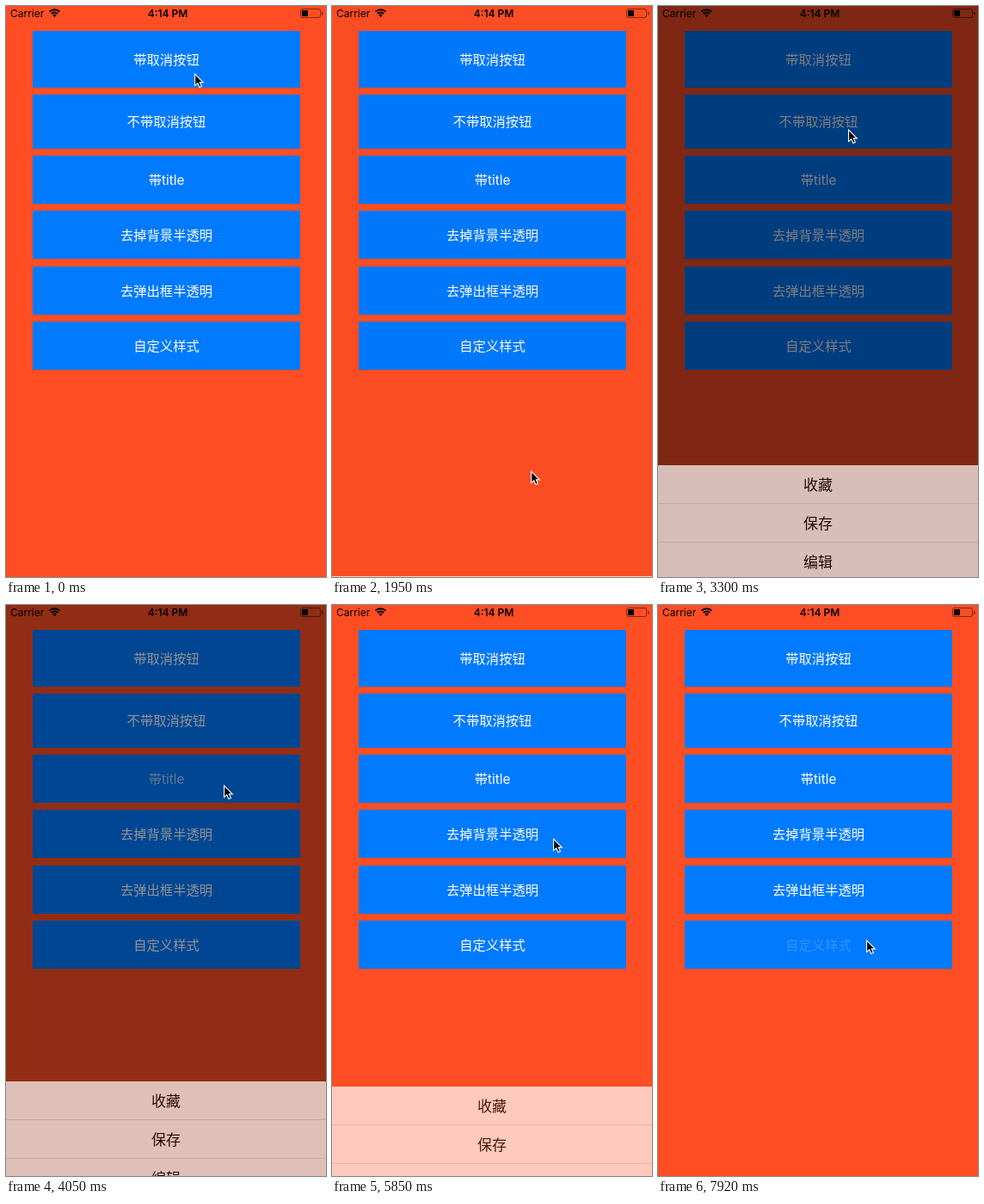
An HTML page with a canvas for the animation above (8000 ms loop, 372 by 664 pixels).

```html
<!DOCTYPE html>
<html lang="zh-CN">
<head>
<meta charset="utf-8">
<style>
html, body { margin: 0; width: 100%; height: 100%; overflow: hidden; background: #ff4e24; }
canvas { display: block; width: 372px; height: 664px; }
</style>
</head>
<body>
<canvas id="stage" width="372" height="664"></canvas>
<script>
const W = 372, H = 664, LOOP = 8000;
const STEP = 149.4, TICK = 150;   // the screen refreshes in steps
const FLOOR = 669;                // sheets rest slightly below the visible edge
const ROW = 45, GAP = 5;
const HOLD = 150, FADE = 340, SLIDE = 250;
const CJK = 'Inter, "Noto Sans CJK SC", "Noto Sans CJK", sans-serif';
const LATIN = 'Inter, Roboto, sans-serif';
const ctx = document.getElementById('stage').getContext('2d');

// Each button is clicked, its sheet opens, and a tap closes it again.
const scenes = [
  { label: '带取消按钮', click: 300, close: 1727, cancel: true },
  { label: '不带取消按钮', click: 2600, close: 3340 },
  { label: '带title', click: 3860, close: 4505 },
  { label: '去掉背景半透明', click: 5150, close: 5780, clearBack: true },
  { label: '去弹出框半透明', click: 6403, close: 7290, solid: true },
  { label: '自定义样式', click: LOOP, close: LOOP }
];

// The pointer sets off for each stop at the given time.
const home = { x: 219, y: 78 };
const stops = [
  { at: 513, x: 233, y: 640 },
  { at: 1778, x: 221, y: 143 },
  { at: scenes[1].close, x: 253, y: 209 },
  { at: scenes[2].close, x: 260, y: 263 },
  { at: scenes[3].close, x: 241, y: 319 },
  { at: scenes[4].close, x: 242, y: 389 }
];

const clamp = v => Math.max(0, Math.min(1, v));
const ease = v => { v = clamp(v); return v * v * (3 - 2 * v); };

function rect(c, color, x, y, w, h) {
  c.fillStyle = color;
  c.fillRect(x, y, w, h);
}

function text(c, str, x, y, font, color, align = 'center') {
  c.font = font;
  c.fillStyle = color;
  c.textAlign = align;
  c.fillText(str, x, y);
}

function makeSheet(cancel) {
  const names = ['收藏', '保存', '编辑'];
  const list = names.length * ROW;
  const sheet = document.createElement('canvas');
  sheet.width = W;
  sheet.height = list + (cancel ? GAP + ROW : 0);
  const c = sheet.getContext('2d');
  const row = (str, y) => text(c, str, 186, y + 29, '17px ' + CJK, '#000');
  rect(c, '#fff', 0, 0, W, sheet.height);
  names.forEach((str, i) => {
    if (i) rect(c, '#dfdfdf', 0, i * ROW - 1, W, 1);
    row(str, i * ROW);
  });
  if (cancel) {
    rect(c, '#c8c8c8', 0, list, W, GAP);
    row('取消', list + GAP);
  }
  return sheet;
}

scenes.forEach((s, i) => {
  s.sheet = makeSheet(s.cancel);
  s.y = i < 2 ? 29 + 74 * i : Math.round(174 + 64.4 * (i - 2));
  s.h = [66, 63][i] || 56;
});

function drawStatus() {
  text(ctx, 'Carrier', 5, 12.5, '12px ' + LATIN, '#000', 'left');
  text(ctx, '4:14 PM', 188, 12.5, '600 12px ' + LATIN, '#000');

  // wifi
  ctx.strokeStyle = '#000';
  ctx.lineWidth = 2;
  for (const r of [8.4, 5.2]) {
    ctx.beginPath();
    ctx.arc(56.5, 12.6, r, -Math.PI * 0.75, -Math.PI * 0.25);
    ctx.stroke();
  }
  ctx.beginPath();
  ctx.moveTo(56.5, 13);
  ctx.arc(56.5, 12.8, 3, -Math.PI * 0.75, -Math.PI * 0.25);
  ctx.fill();

  // battery
  ctx.strokeStyle = 'rgba(0,0,0,.5)';
  ctx.lineWidth = 1;
  ctx.beginPath();
  ctx.roundRect(342.5, 3.5, 23, 10, 2);
  ctx.stroke();
  rect(ctx, 'rgba(0,0,0,.5)', 367, 7, 1.5, 3.5);
  rect(ctx, '#000', 344, 5, 7, 7);
}

function drawButton(s, t) {
  const a = t < s.click - HOLD ? 1 : 0.2 + 0.8 * clamp((t - s.click) / FADE);
  rect(ctx, '#007aff', 31, s.y, 311, s.h);
  text(ctx, s.label, 186.5, s.y + s.h / 2 + 5.7, '15.3px ' + CJK, `rgba(255,255,255,${a})`);
}

function drawSheet(s, t) {
  const p = ease((t - s.click) / SLIDE) - ease((t - s.close) / SLIDE);
  if (p <= 0) return;
  if (!s.clearBack) rect(ctx, `rgba(0,0,0,${p / 2})`, 0, 0, W, H);
  ctx.globalAlpha = s.solid ? 1 : 0.7;
  ctx.drawImage(s.sheet, 0, Math.round(FLOOR - s.sheet.height * p));
  ctx.globalAlpha = 1;
}

function pointerAt(t) {
  let { x, y } = home;
  for (const s of stops) {
    const dx = s.x - x, dy = s.y - y;
    const k = ease((t - s.at) / (250 + 0.7 * Math.hypot(dx, dy)));
    x += dx * k;
    y += dy * k;
    if (k < 1) break;
  }
  return [Math.round(x), Math.round(y)];
}

const arrow = new Path2D('M.6 1.2V14.6L3.7 11.7 5.9 16.6 8.4 15.5 6.3 10.9H10.3Z');

function drawPointer(t) {
  ctx.save();
  ctx.translate(...pointerAt(t));
  ctx.fillStyle = '#000';
  ctx.fill(arrow);
  ctx.strokeStyle = '#fff';
  ctx.lineWidth = 1.1;
  ctx.stroke(arrow);
  ctx.restore();
}

function draw(now) {
  const t = Math.floor((now % LOOP) / STEP) * TICK;
  rect(ctx, '#ff4e24', 0, 0, W, H);
  drawStatus();
  for (const s of scenes) drawButton(s, t);
  for (const s of scenes) drawSheet(s, t);
  drawPointer(t);
}

const start = performance.now();
function frame() {
  draw(performance.now() - start);
  requestAnimationFrame(frame);
}
frame();
</script>
</body>
</html>
```
